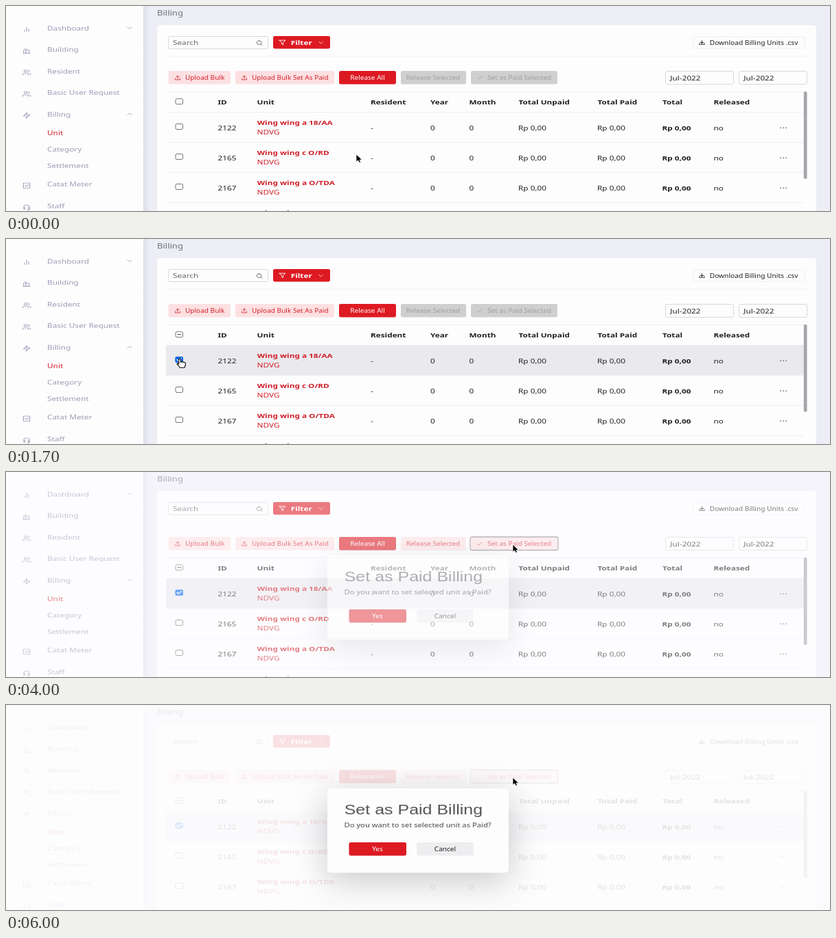
These frames come from a looping animation (1200x300 px, 6.1 s). An HTML page:

```html
<!DOCTYPE html>
<html lang="en">
<head>
<meta charset="utf-8">
<title>Billing</title>
<style>
html, body { margin: 0; width: 100%; height: 100%; overflow: hidden; background: #ededf6; }
svg { display: block; }
text { font-family: "Noto Sans", "Open Sans", sans-serif; white-space: pre; }
#title { font-family: "Liberation Sans", Arial, sans-serif; }
#panel { filter: drop-shadow(0 11px 25px rgba(0, 0, 0, .21)); }
</style>
</head>
<body>
<svg id="stage" width="1200" height="300" viewBox="0 0 1200 300"></svg>
<script>
const LOOP = 6100, SQUASH = 0.8;   // the screen is shown flattened to 80 % height
const RED = '#dd1a22', INK = '#d3222a', PINK = '#fce0e2', MUTED = '#9c9cb7', DARK = '#1f1f22', WHITE = '#fdfdfe';

const ICON = {
  bars: 'M6 20V14M12 20V4M18 20V10',
  building: 'M4 21V9l6-4v16M10 10h9v11M2 21h20',
  users: 'M17 21v-2a4 4 0 0 0-4-4H5a4 4 0 0 0-4 4v2M9 3a4 4 0 1 0 .01 0M23 21v-2a4 4 0 0 0-3-3.9M16 3.1a4 4 0 0 1 0 7.8',
  zap: 'M13 2L3 14h9l-1 8 10-12h-9z',
  task: 'M8 11l4 4 5-6M3 3h18v18H3z',
  headset: 'M4 15v-3a8 8 0 0 1 16 0v3M4 13h3v6H4zM17 13h3v6h-3zM20 19q0 3-6 3',
  upload: 'M4 15v5h16v-5M12 16V4M7 9l5-5 5 5',
  download: 'M4 15v5h16v-5M12 4v12M7 11l5 5 5-5',
  search: 'M11 3a8 8 0 1 0 .01 0M21 21l-4.4-4.4',
  funnel: 'M3 4h18l-7 8v8l-4-2v-6z',
  check: 'M4 12l5 5L20 6',
  down: 'M5 9l7 7 7-7',
  up: 'M5 16l7-7 7 7'
};

const text = (s, x, y, { size = 11.8, fill = DARK, weight = 400, anchor = 'start', id = '' } = {}) =>
  `<text id="${id}" transform="translate(${x} ${y}) scale(1 ${SQUASH})" font-size="${size}" ` +
  `font-weight="${weight}" fill="${fill}" text-anchor="${anchor}">${s}</text>`;

const rect = (x, y, x2, y2, fill, r = 3, extra = '') =>
  `<rect x="${x}" y="${y}" width="${x2 - x}" height="${y2 - y}" rx="${r}" ry="${r * SQUASH}" fill="${fill}" ${extra}/>`;

const icon = (name, x, y, color = MUTED, s = 0.52, width = 2) =>
  `<path transform="translate(${x} ${y}) scale(${s} ${s * SQUASH}) translate(-12 -12)" d="${ICON[name]}" ` +
  `fill="none" stroke="${color}" stroke-width="${width}" stroke-linejoin="round" stroke-linecap="round"/>`;

const group = (id, body) => `<g id="${id}">${body}</g>`;
const line = (y, color = '#efeff3', x2 = 1162) => rect(233, y, x2, y + 1, color, 0);
const field = (x, y, x2, y2, color = '#d8d8dc') => rect(x, y, x2, y2, WHITE, 2.5, `stroke="${color}"`);
const box = y => rect(247, y - 4, 257.5, y + 4, '#fff', 2, 'stroke="#747478"');
const small = (s, x, fill, extra) => text(s, x, 108.2, { size: 10.05, fill, ...extra });

function sidebar() {
  const items = [['Dashboard', 32.2, 'bars'], ['Building', 63.7, 'building'], ['Resident', 95.5, 'users'],
    ['Basic User Request', 127, 'users'], ['Billing', 158.3, 'zap'], ['Catat Meter', 261, 'task'], ['Staff', 292.6, 'headset']];
  const subs = [['Unit', 186, INK], ['Category', 210, MUTED], ['Settlement', 233.5, MUTED]];
  return rect(0, 0, 200, 300, WHITE, 0) +
    items.map(([s, y, name]) => text(s, 60, y + 3.4, { fill: MUTED }) + icon(name, 30, y + 1.8)).join('') +
    subs.map(([s, y, fill]) => text(s, 60, y + 3.4, { fill })).join('') +
    icon('down', 180, 32, MUTED, 0.45) + icon('up', 180, 158, MUTED, 0.45);
}

function lateButtons(fill, ink) {
  return rect(575, 95, 670, 114.5, fill) + small('Release Selected', 622, ink, { anchor: 'middle' }) +
    rect(677, 95, 803, 114.5, fill) + icon('check', 690, 105, ink, 0.42) + small('Set as Paid Selected', 701, ink);
}

function toolbar() {
  return field(236.5, 44.5, 381.5, 62.5) + text('Search', 243, 57.2, { fill: '#66666c' }) + icon('search', 369, 54, '#55555c', 0.45) +
    rect(389, 44, 472, 62.5, RED) + icon('funnel', 402.5, 53.4, '#fff', 0.5) +
    text('Filter', 414.7, 57, { fill: '#fff', weight: 700 }) + icon('down', 458.5, 53.5, '#fff', 0.4) +
    field(1000.5, 45, 1163, 62, '#efeff2') + icon('download', 1013.5, 53.5, DARK, 0.45, 2.3) +
    text('Download Billing Units .csv', 1024.7, 56.6, { size: 10.2, weight: 500 }) +
    line(73, '#f4f4f7', 1167) +
    rect(236.5, 95, 327, 114.5, PINK) + icon('upload', 250, 105, INK, 0.45) + small('Upload Bulk', 261, INK) +
    rect(334, 95, 478, 114.5, PINK) + icon('upload', 347, 105, INK, 0.45) + small('Upload Bulk Set As Paid', 358, INK) +
    rect(485, 95, 568, 114.5, RED) + small('Release All', 526.5, '#fff', { anchor: 'middle' }) +
    lateButtons('#cfcfd0', '#a09fa1') + group('active', lateButtons(PINK, INK)) +
    group('focus', rect(676, 95, 804, 114.5, 'none', 3.5, 'stroke="#8b8488" stroke-width="1.3"')) +
    [960, 1067].map(x => field(x + .5, 95.5, x + 99.5, 114.5) + text('Jul-2022', x + 7.3, 108.7)).join('');
}

function table() {
  const heads = [['ID', 308.5], ['Unit', 365.5], ['Resident', 531], ['Year', 618], ['Month', 674.5],
    ['Total Unpaid', 746.5], ['Total Paid', 861.5], ['Total', 956], ['Released', 1030.5]];
  const rows = [['2122', 'a 18/AA'], ['2165', 'c O/RD'], ['2167', 'a O/TDA'], ['2168', 'a O/TDB']];
  const row = ([id, unit], i) => {
    const y = 177.5 + 44 * i, cell = (s, x, opt) => text(s, x, y + 4, opt);
    return text('Wing wing ' + unit, 365.7, y - 3.3, { fill: i < 3 ? '#cf1c25' : '#54484c', weight: 700 }) +
      text('NDVG', 365.5, y + 10.5, { fill: INK }) +
      box(y - 1) + cell(id, 308.5) + cell('-', 531) + cell('0', 618) + cell('0', 674.5) +
      cell('Rp 0,00', 746) + cell('Rp 0,00', 861) + cell('Rp 0,00', 955.5, { weight: 700 }) + cell('no', 1030.5) +
      [1128, 1132, 1136].map(x => rect(x - .9, y, x + .9, y + 1.5, '#55555a', .8)).join('') + line(y + 21.7);
  };
  return line(125) + group('chosen', rect(233, 155.5, 1162, 199.5, '#eaeaee', 0)) + line(155) +
    heads.map(([s, x]) => text(s, x, 144, { weight: 600 })).join('') + box(139.7) + rows.map(row).join('') +
    group('ticks', rect(249.5, 139.1, 255, 140.3, '#55555a', 0) +
      rect(246.5, 172.2, 258, 180.8, '#0b6cf0', 2) + icon('check', 252.2, 176.5, '#fff', 0.4, 3.4)) +
    rect(1161.8, 125, 1166.5, 253, '#a5a4a9', 2.2);
}

function dialog() {
  return rect(468, 122, 732, 245.5, WHITE, 6, 'id="panel"') +
    text('Set as Paid Billing', 492.7, 160, { size: 25, fill: '#555558', id: 'title' }) +
    text('Do you want to set selected unit as Paid?', 492.5, 178.7, { size: 11.24, fill: '#48484c' }) +
    rect(499.5, 201, 583, 220.5, RED) + text('Yes', 541, 214.2, { size: 10.05, fill: '#fff', anchor: 'middle' }) +
    rect(598, 201, 681, 220.5, '#eeeef0') + text('Cancel', 639.5, 214.2, { size: 10.05, anchor: 'middle', weight: 500 });
}

const pointers =
  `<path id="arrow" d="M0 0V11L2.7 8.9L4.6 12.3L6.7 11.6L5 8.2H8.6Z" fill="#000" stroke="#fff" stroke-width=".8"/>` +
  `<path id="hand" d="M-1.2 1.2Q0-.6 1.4 1V5.2Q2.8 4 4 5.3Q5.3 4.4 6.2 5.8Q8 5 8.4 7Q8.8 10 6.8 13.2H.3Q-1.6 10.2-4 8.2Q-4 6.2-1.2 8Z" ` +
  `fill="#fff" stroke="#000" stroke-width="1.1" stroke-linejoin="round"/>` +
  `<path id="beam" d="M-4-6Q-.5-6 0-4.5Q.5-6 4-6M0-4.5V5.5M-4 7Q-.5 7 0 5.5Q.5 7 4 7M-2 2.5H2" fill="none" stroke="#222" stroke-width="1.1"/>`;

document.getElementById('stage').innerHTML =
  `<defs><linearGradient id="edge"><stop stop-color="#dedee9"/><stop offset="1" stop-color="#dedee9" stop-opacity="0"/></linearGradient></defs>` +
  rect(0, 0, 1200, 300, '#ededf6', 0) + rect(200, 0, 209, 300, 'url(#edge)', 0) + sidebar() +
  text('Billing', 220, 13.5, { size: 13, fill: '#707078' }) + rect(220, 28, 1180, 320, WHITE, 5) +
  toolbar() + table() + group('veil', rect(0, 0, 1200, 300, WHITE, 0)) + group('dialog', dialog()) + group('cursor', pointers);

// Cursor stops: time, x, y
const PATH = [[0, 510, 217], [300, 538, 211], [500, 538, 211], [1100, 400, 194], [1500, 253, 175], [1900, 253, 175],
  [2300, 699, 137], [2650, 738, 108], [3200, 738, 107], [3300, 738, 106], [LOOP, 738, 106]];
// Pointer shape from each time on
const SHAPES = [[0, 'arrow'], [1450, 'hand'], [1950, 'arrow'], [2220, 'beam'], [2420, 'arrow'], [2580, 'hand'], [3850, 'arrow']];

const $ = id => document.getElementById(id);
const ramp = (t, a, b) => Math.min(1, Math.max(0, (t - a) / (b - a)));
const show = (id, on) => $(id).setAttribute('opacity', +on);

function draw(t) {
  const i = PATH.findIndex(p => p[0] > t), [a, x, y] = PATH[i - 1], [b, x2, y2] = PATH[i];
  const p = ramp(t, a, b), k = p * p * (3 - 2 * p);
  $('cursor').setAttribute('transform', `translate(${x + (x2 - x) * k} ${y + (y2 - y) * k})`);
  const shape = SHAPES.filter(s => s[0] <= t).pop()[1];
  for (const id of ['arrow', 'hand', 'beam']) show(id, id === shape);
  show('chosen', t >= 1700);
  show('ticks', t >= 1700);
  show('active', ramp(t, 1750, 2050));
  show('focus', t >= 3700);
  show('veil', 0.88 * Math.sin(ramp(t, 3850, 4320) * Math.PI / 2));
  show('dialog', ramp(t, 3820, 4220));
}

const start = performance.now();
function tick() {
  draw((performance.now() - start) % LOOP);
  requestAnimationFrame(tick);
}
tick();
</script>
</body>
</html>
```
